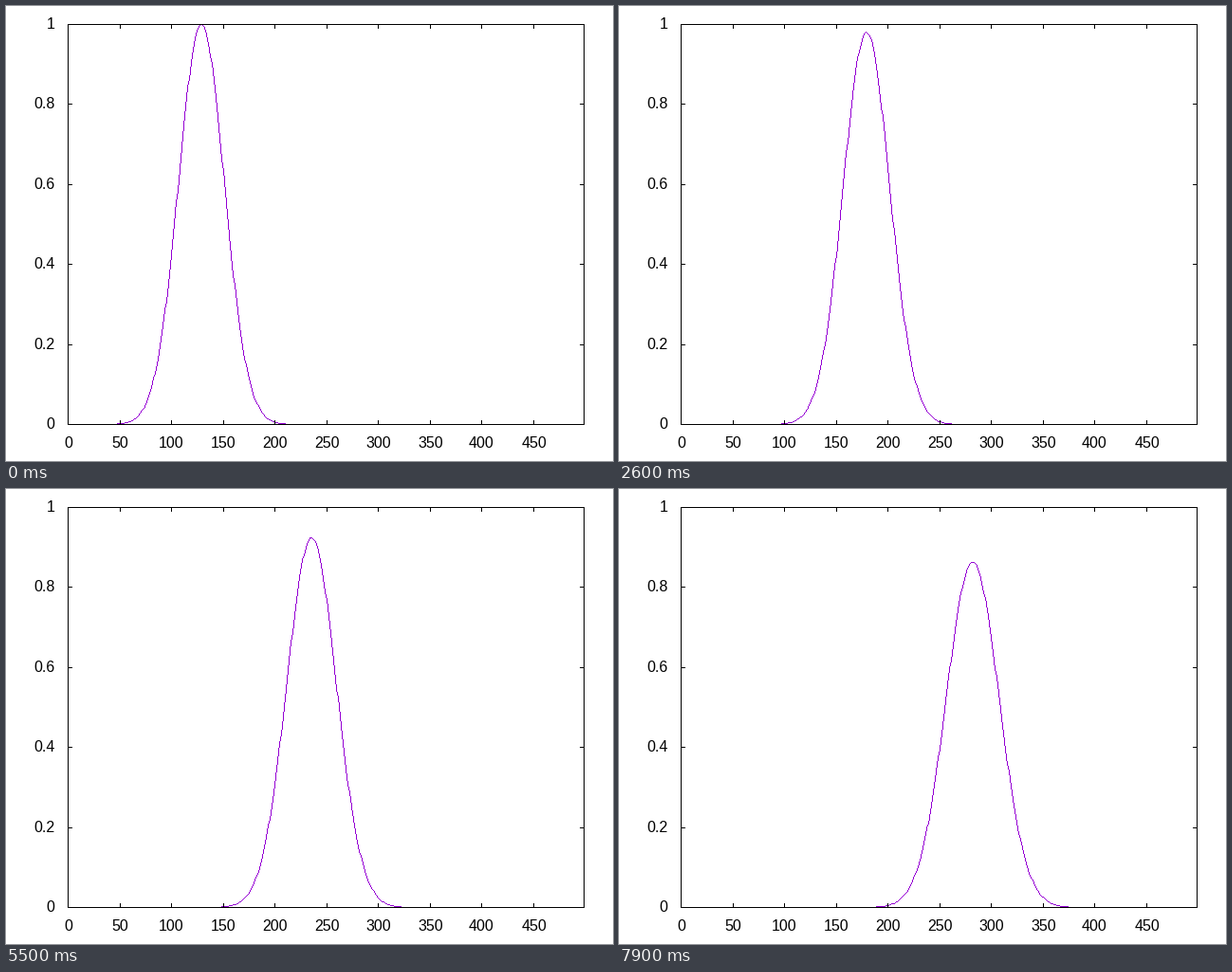
These frames come from a looping animation (640 by 480 pixels, 8 s). A matplotlib script:

```python
import numpy as np
import matplotlib.pyplot as plt
from matplotlib.animation import FuncAnimation

W, H, DPI = 640, 480, 100
LEFT, RIGHT, TOP, BOTTOM = 65, 609, 19, 441
X_MAX = 499
TICK = 5
FRAMES, INTERVAL = 80, 100
PURPLE = (148, 0, 211)
BLACK = (0, 0, 0)

# Spreading Gaussian wave packet
START, SPEED, SIGMA, SPREAD, LEAD = 125.05, 1.937, 22.11, 0.00722, 2

plt.rcParams["font.family"] = "Liberation Sans"
samples = np.arange(X_MAX + 1)


def px(x):
    return np.floor(LEFT + x * (RIGHT - LEFT) / X_MAX + 0.5).astype(int)


def py(y):
    return BOTTOM - np.floor(y * (BOTTOM - TOP) + 0.5).astype(int)


def density(n):
    t = n + LEAD
    peak = 1 / np.sqrt(1 + (SPREAD * t) ** 2)
    d = (samples - START - SPEED * t) * peak / SIGMA
    return peak * np.exp(-d * d / 2)


def polyline(img, xs, ys, color):
    """Draw hard-edged, one pixel wide segments between whole pixels."""
    for x0, y0, x1, y1 in zip(xs, ys, xs[1:], ys[1:]):
        steps = max(abs(x1 - x0), abs(y1 - y0))
        f = np.arange(steps + 1) / max(steps, 1)
        cols = np.floor(x0 + f * (x1 - x0) + 0.5).astype(int)
        rows = np.floor(y0 + f * (y1 - y0) + 0.5).astype(int)
        img[rows, cols] = color


x_ticks = np.arange(0, 451, 50)
y_ticks = np.arange(6) / 5


def border(img):
    img[[TOP, BOTTOM], LEFT:RIGHT + 1] = BLACK
    img[TOP:BOTTOM + 1, [LEFT, RIGHT]] = BLACK
    for x in px(x_ticks):
        img[TOP:TOP + TICK, x] = BLACK
        img[BOTTOM - TICK + 1:BOTTOM, x] = BLACK
    for y in py(y_ticks):
        img[y, LEFT:LEFT + TICK] = BLACK
        img[y, RIGHT - TICK + 1:RIGHT] = BLACK


def picture(n):
    img = np.full((H, W, 3), 255, np.uint8)
    polyline(img, px(samples), py(density(n)), PURPLE)
    border(img)
    return img


fig = plt.figure(figsize=(W / DPI, H / DPI), dpi=DPI, facecolor="white")
plot = fig.figimage(picture(0), origin="upper")


def label(x, y, s, ha):
    fig.text(x / W, 1 - y / H, s, ha=ha, va="baseline",
             fontsize=16 * 72 / DPI, color="black")


for v in x_ticks:
    label(px(v) + 0.5, 466, f"{v}", "center")
for v in y_ticks:
    label(51.5, py(v) + 5, f"{v:g}", "right")


def update(n):
    plot.set_data(picture(n))
    return [plot]


anim = FuncAnimation(fig, update, frames=FRAMES, interval=INTERVAL,
                     repeat=True, repeat_delay=0, blit=False)
plt.show()
```
